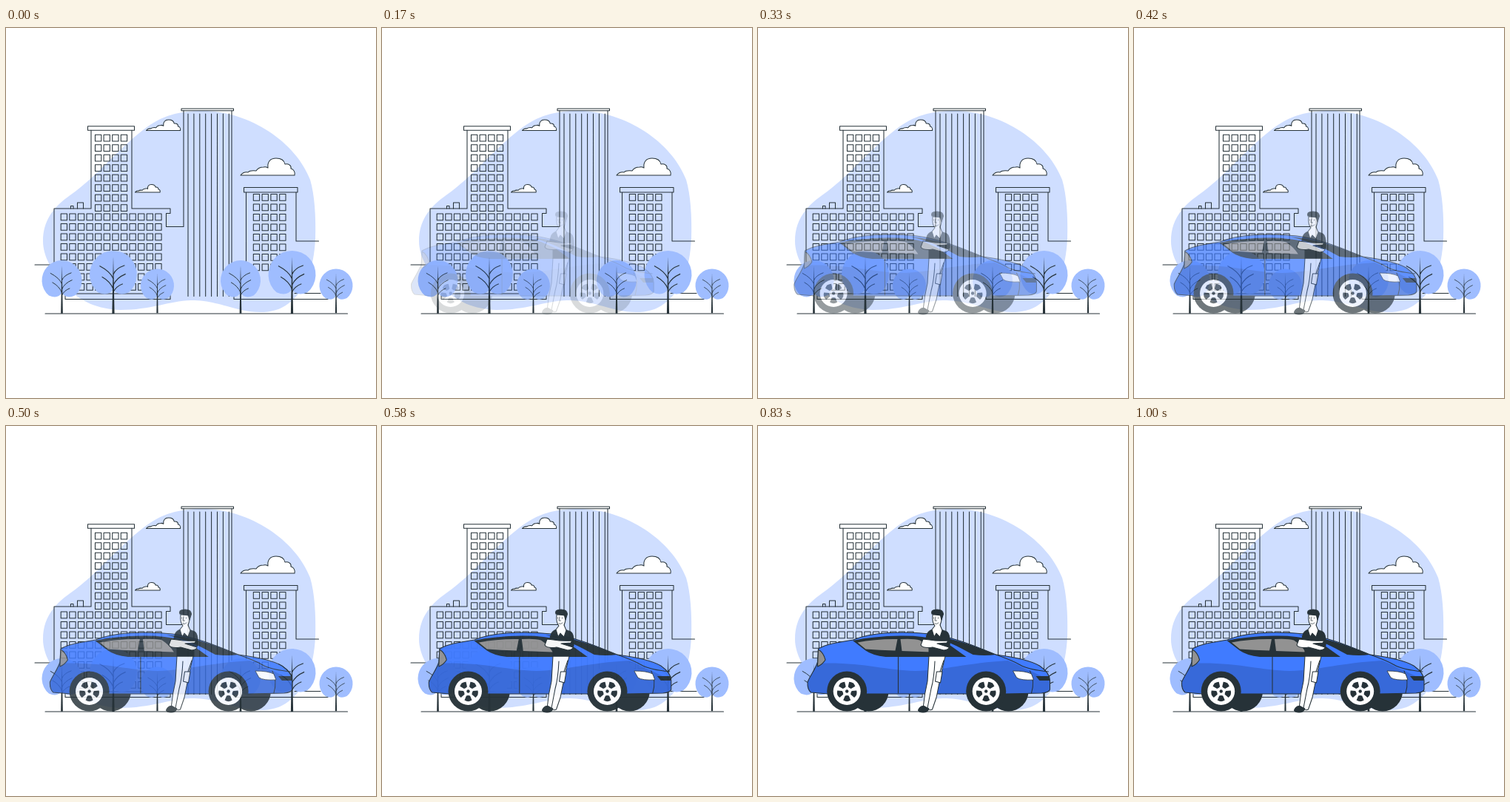
An HTML page for the animation above (1.04 s loop, 500x500 px).

```html
<!DOCTYPE html>
<html lang="en">
<head>
<meta charset="utf-8">
<title>Man by his car in the city</title>
<style>
html, body { margin: 0; width: 100%; height: 100%; overflow: hidden; background: #fff; }
svg { display: block; width: 100vw; height: 100vh; }
.line { fill: none; stroke: #263238; stroke-width: 1.05; stroke-linejoin: round; stroke-linecap: round; }
.dark { fill: #263238; }
.white { fill: #fff; }
.glass { fill: #929292; }
</style>
</head>
<body>
<svg viewBox="0 0 500 500">
  <defs>
    <path id="cloud" vector-effect="non-scaling-stroke" d="M0 0Q4-5 10-4Q13-7 21-6Q24-11 31-11Q34-12 37-10C36-18 40-23 48-23C55-23 59-20 60-15C65-16 69-13 68-9C72-8 74-4 73 0Z"/>
    <g id="tree">
      <path fill="#9fbdff" d="M0 .62Q-.2.95-.65.76A1 1 0 1 1 .65.76Q.2.95 0 .62Z"/>
      <path class="dark" d="M-.05 1.66L-.02.1L0-.75L.02.1L.05 1.66Z"/>
      <path fill="none" stroke="#263238" stroke-width=".035" d="M0 .62Q-.12.3-.48.1M0 .18Q-.12-.12-.58-.36M0 .45Q.12.15.52-.02M0 0Q.1-.25.48-.38M0 .75Q.12.5.4.4"/>
    </g>
    <g id="wheel">
      <circle class="dark" r="27"/>
      <circle class="white" r="18.5"/>
      <g id="holes" class="dark"></g>
      <circle class="dark" r="2.2"/>
    </g>
    <path id="body" d="M64.500 346C68 337 75 329 78 319L79 301C92 294 108 292 126 289C150 279 190 277 230 281C262 285 292 298 319 309C342 312 366 317 378 324C388 331 392 338 392 344V356Q391 360 381 361L330 362H92L69 360Q64 356 64.500 346Z"/>
    <clipPath id="bodyClip"><use href="#body"/></clipPath>
  </defs>

  <path fill="#cfdeff" d="M50 288C50 262 62 243 88 225C120 203 150 165 185 138C210 118 235 112 265 112C330 112 392 155 411 205C417 225 419 255 418 285C416 325 405 355 382 372C365 386 340 386 318 381C290 374 275 368 250 368C220 369 195 381 155 381C125 380 100 370 82 350C62 330 50 308 50 288Z"/>

  <g class="line">
    <path d="M110.500 132.700H173.500V138.200H110.500ZM115 138V244H65V320H39M170 138V244H222V250.500H216.500V268.500H240V111.500"/>
    <path d="M96.500 244V236H104.500V244M87.500 244V240.500H91V244M80 359H222V366.500H80Z"/>
    <path d="M237 109H307.500V111.700H237ZM305 111.500V362M321.500 215.500H394V222H321.500ZM324.500 222V330M392 222V288H422.500"/>
    <path d="M308 362V366.500H435V362M390 358.500H425M53 386H461.500"/>
    <path id="grid"/>
    <g class="white">
      <use href="#cloud" transform="translate(317 199)"/>
      <use href="#cloud" transform="translate(189.500 138.500) scale(.63)"/>
      <use href="#cloud" transform="translate(174.500 222) scale(.46)"/>
    </g>
  </g>

  <g id="trees"></g>

  <g id="car">
    <circle class="dark" cx="147" cy="358.500" r="27"/>
    <circle class="dark" cx="336" cy="358.500" r="27"/>
    <use href="#body" fill="#407bff"/>
    <path clip-path="url(#bodyClip)" fill="#3769d9" d="M60 322C130 316 165 330 210 331C250 330 280 320 335 317C350 322 355 328 366 331L395 345V365H60Z"/>
    <use href="#body" class="line"/>
    <path class="line" style="fill:#929292" d="M79 302Q86 306 88.500 316Q85 322 78 325Z"/>
    <path class="dark" d="M125.500 290Q153 284 190 283.500Q220 283 240 289L258 297L279 312H170Q152 310 143 303.500Z"/>
    <path class="glass" d="M132 292.500Q157 287.500 186 288L183 303.500Q162 303 143 301.500ZM190 288Q208 287 216 289.500Q226 296 232 305.500L192 304Z"/>
    <path class="dark" d="M222 282.500C252 284 286 295 319 309Q304 311 288 309C268 298 250 288 222 282.500Z"/>
    <path class="line" d="M187 312V361M319 309Q342 317 352 323T390 332M365 331Q372 345 367 361"/>
    <path class="white" stroke="#263238" stroke-width=".8" d="M342 331Q359 331 367 335L370 343Q353 344 347 340Z"/>
    <path class="dark" d="M373 338H391.500V344H378Z"/>
    <use href="#wheel" x="117.700" y="358.500"/>
    <use href="#wheel" x="305.700" y="358.500"/>
  </g>

  <g id="man" class="line">
    <path class="white" d="M231 311H253L247 337L241 367L235.500 383Q231 385 227 381L223.500 378Q225 362 229 345Z"/>
    <path d="M239 318Q238 341 234 355L229 381M251 317L246 332"/>
    <path class="white" d="M241.500 332H249L246.500 347L239.500 345Z"/>
    <path class="dark" d="M216.500 384Q219 378 224 378.500L231 382Q229 387 223 387Q217 387 216.500 384Z"/>
    <path class="dark" d="M236 275Q229 277 228 283L226 291L231 296L231 311H253V302L259 297Q260 281 255 278L247 275Z"/>
    <path class="white" d="M236 255Q235 266 239 270L235 275L238 285L241 280L246 285L249 276L246 269Q249 262 248 255Z"/>
    <path class="white" d="M223 288L220 296Q223 301 236 299L251 303Q258 302 258 299L242 294L255 293L257 290Q242 291 232 289Z"/>
    <path class="dark" d="M235 254Q233 248 242 248Q250 248 250.500 254L248 262L246.500 256Q240 255 235 254Z"/>
    <path stroke-width=".7" d="M240 258L239 263H241.500M237.500 259V260M243.500 259V260M239 267Q242 268.500 244 266"/>
  </g>
</svg>
<script>
const get = id => document.getElementById(id);

// Window squares and the stripes of the tall block
const windows = (x, y, cols, rows, pitch = 11.6) => {
  let d = "";
  for (let r = 0; r < rows; r++)
    for (let c = 0; c < cols; c++)
      d += `M${x + c * pitch} ${y + r * 13.5}h8.300v8.700h-8.300z`;
  return d;
};
let grid = windows(120.5, 144.2, 4, 8) + windows(74.2, 251, 12, 8) + windows(334.3, 224.5, 4, 8, 11.8);
for (let i = 0; i < 8; i++) grid += `M${246 + i * 7.9} 116V362.500`;
get("grid").setAttribute("d", grid);

get("trees").innerHTML = [
  [75.5, 341, 27], [145, 333, 32], [204.5, 348, 22.5],
  [317, 341, 27], [386.5, 333, 32], [446, 348, 22.5]
].map(([x, y, r]) => `<use href="#tree" transform="translate(${x} ${y}) scale(${r})"/>`).join("");

get("holes").innerHTML = [0, 1, 2, 3, 4].map(i =>
  `<path d="M-2.500-6L-5-12Q0-15.500 5-12L2.500-6Q0-5 -2.500-6Z" transform="rotate(${36 + i * 72})"/>`).join("");

// Slide-in with overshoot: a smooth curve through evenly spaced values
const keys = [0, 0.17, 0.48, 0.83, 1.05, 1.083, 1];
function ease(t) {
  const s = t * 6, i = Math.min(5, Math.floor(s)), u = s - i;
  const a = keys[i], b = keys[i + 1];
  const m = (b - (keys[i - 1] ?? a)) / 2, n = ((keys[i + 2] ?? b) - a) / 2;
  return a + u * (m + u * (3 * (b - a) - 2 * m - n + u * (2 * (a - b) + m + n)));
}

const LOOP = 1040, STEP = LOOP / 25;
const start = performance.now();
function draw() {
  const time = (performance.now() - start) % LOOP;
  const step = Math.min(24, Math.floor((time + 4) / STEP));
  const p = ease(step / 24);
  get("car").setAttribute("transform", `translate(${30 * (p - 1)} 0)`);
  for (const id of ["car", "man"]) get(id).setAttribute("opacity", Math.min(1, p));
  requestAnimationFrame(draw);
}
draw();
</script>
</body>
</html>
```
